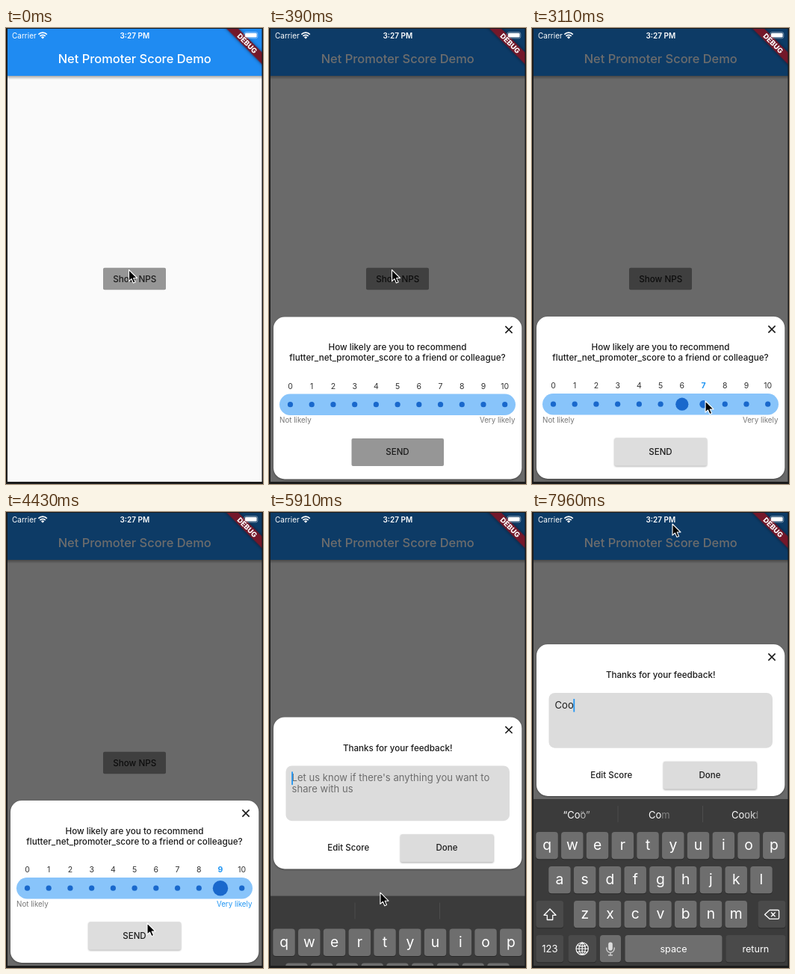
These frames come from a looping animation (344 px wide and 610 px high, 7990 ms). An HTML page:

```html
<!DOCTYPE html>
<html lang="en">
<head>
<meta charset="utf-8">
<title>Score sheet</title>
<style>
  html, body { margin: 0; width: 100%; height: 100%; overflow: hidden; background: #1b1b1b; }
  svg { display: block; width: 344px; height: 610px; }
  text { font-family: Inter, Roboto, sans-serif; white-space: pre; }
  .raised { filter: drop-shadow(0 1px 1px rgba(0, 0, 0, .35)); }
</style>
</head>
<body>
<svg id="stage" viewBox="0 0 344 610">
  <defs>
    <linearGradient id="fade" x2="0" y2="1">
      <stop stop-opacity=".32"/><stop offset="1" stop-opacity="0"/>
    </linearGradient>
  </defs>
</svg>
<script>
const LOOP = 7990;
const BLUE = '#2196f3', INK = '#1c1c1c', KEY = '#6e6e6e', DARK_KEY = '#4a4a4a';
const stage = document.getElementById('stage');

function el(tag, attrs, parent = stage, content) {
  const node = document.createElementNS('http://www.w3.org/2000/svg', tag);
  for (const name in attrs) node.setAttribute(name, attrs[name]);
  if (content !== undefined) node.textContent = content;
  return parent.appendChild(node);
}
const group = (parent = stage) => el('g', {}, parent);
const rect = (parent, x, y, width, height, fill, rx = 0, more = {}) =>
  el('rect', { x, y, width, height, fill, rx, ...more }, parent);
const label = (parent, x, y, size, content, more = {}) =>
  el('text', { x, y, 'font-size': size, 'text-anchor': 'middle', fill: INK, ...more }, parent, content);
const line = (parent, d, stroke, width, more = {}) =>
  el('path', { d, stroke, 'stroke-width': width, fill: 'none', ...more }, parent);
const medium = { 'font-weight': 500 };

// Page
const page = group();
rect(page, 2, 1, 341, 606, '#fafafa');
rect(page, 2, 64, 341, 5, 'url(#fade)');
rect(page, 2, 1, 341, 63, '#1f8bf2');
label(page, 172.2, 47.2, 16.45, 'Net Promoter Score Demo', { fill: '#fff', ...medium });
rect(page, 130, 320.8, 84, 29.4, '#969696', 2);
label(page, 172.2, 339.5, 11.7, 'Show NPS', medium);
const scrim = rect(stage, 2, 1, 341, 606, '#000');

function sheet(height) {
  const g = group();
  rect(g, 6, 0, 332.3, height, '#fff', 15, { class: 'raised' });
  line(g, 'M316.4 12.4l9.2 9.2m0-9.2l-9.2 9.2', INK, 1.6);
  return g;
}

// Score sheet
const scoreSheet = sheet(217);
label(scoreSheet, 172, 45, 11.65, 'How likely are you to recommend', medium);
label(scoreSheet, 172, 58.7, 11.7, 'flutter_net_promoter_score to a friend or colleague?', medium);
rect(scoreSheet, 14, 103, 316, 28.5, '#88c4fa', 14.25);
const marks = Array.from({ length: 11 }, (_, i) => {
  const x = 28.5 + 28.72 * i;
  return {
    number: label(scoreSheet, x, 96.3, 10.5, i),
    dot: el('circle', { cx: x, cy: 117.2, r: 3.6, fill: '#1968cc' }, scoreSheet)
  };
});
const notLikely = label(scoreSheet, 14, 142, 9.8, 'Not likely', { 'text-anchor': 'start' });
const veryLikely = label(scoreSheet, 329.5, 142, 9.8, 'Very likely', { 'text-anchor': 'end' });
const sendShadow = rect(scoreSheet, 110.5, 162.5, 123.5, 37, '#ddd', 2, { class: 'raised' });
const send = rect(scoreSheet, 110.5, 162.5, 123.5, 37, '#ddd', 2);
label(scoreSheet, 172, 185, 11.5, 'SEND', medium);

// Feedback sheet
const feedbackSheet = sheet(203);
label(feedbackSheet, 172.2, 45.2, 11.65, 'Thanks for your feedback!', medium);
rect(feedbackSheet, 22.5, 65, 299.5, 73.7, '#dcdcdc', 8);
const hint = group(feedbackSheet);
const hintStyle = { 'text-anchor': 'start', fill: '#6d6d6d' };
label(hint, 30.6, 85.4, 13.05, "Let us know if there's anything you want to", hintStyle);
label(hint, 30.6, 101, 13.05, 'share with us', hintStyle);
const typed = label(feedbackSheet, 30.6, 85.6, 13.05, '', { 'text-anchor': 'start' });
const caret = rect(feedbackSheet, 0, 73, 1.8, 17.5, BLUE);
label(feedbackSheet, 106.3, 179, 11.5, 'Edit Score', medium);
rect(feedbackSheet, 176, 156.7, 124.5, 37, '#dcdcdc', 2, { class: 'raised' });
label(feedbackSheet, 238, 179, 11.5, 'Done', medium);

// Keyboard
const keyboard = group();
rect(keyboard, 2, 0, 341, 240, '#3b3b3b');
line(keyboard, 'M115 9v22M228.5 9v22', '#4c4c4c', 1);

function key(x, y, width, fill, content, size) {
  rect(keyboard, x, y + 1, width, 36.3, '#292929', 4);
  rect(keyboard, x, y, width, 36.3, fill, 4);
  if (content) label(keyboard, x + width / 2, y + (size > 15 ? 24 : 22.5), size, content, { fill: '#fff' });
}
['qwertyuiop', 'asdfghjkl', 'zxcvbnm'].forEach((row, r) => {
  const left = [5.3, 22.2, 56][r];
  [...row].forEach((c, i) => key(left + 33.75 * i, 44 + 46 * r, 29.5, KEY, c, 19.3));
});
key(5.3, 136, 37, DARK_KEY);
key(302.5, 136, 37, DARK_KEY);
key(5.3, 182, 37, DARK_KEY, '123', 13);
key(48.5, 182, 37.5, DARK_KEY);
key(91, 182, 28, KEY);
key(124.5, 182, 130, KEY, 'space', 12.6);
key(259.3, 182, 80.2, DARK_KEY, 'return', 12.6);
line(keyboard, 'M24 147l8 8.3h-4.3v6.2h-7.4v-6.2H16z', '#fff', 1.3, { 'stroke-linejoin': 'round' });
line(keyboard, 'M318 148.5h11q1.6 0 1.6 1.6v8.6q0 1.6-1.6 1.6h-11l-6.5-5.9zM320 151.5l5.6 5.8m0-5.8l-5.6 5.8',
  '#fff', 1.3, { 'stroke-linejoin': 'round' });
line(keyboard, 'M59 200.2a8.2 8.2 0 1 0 16.4 0a8.2 8.2 0 1 0-16.4 0zh16.4M67.2 192v16.4' +
  'M67.2 192c-5.6 4-5.6 12.4 0 16.4c5.6-4 5.6-12.4 0-16.4M60.7 195.5q6.5 3 13 0M60.7 205q6.5-3 13 0', '#fff', 1.1);
rect(keyboard, 102.2, 191.5, 5.6, 11, '#ddd', 2.8);
line(keyboard, 'M99.8 198.5v1.7a5.2 5.2 0 0 0 10.4 0v-1.7M105 205.4v3.4m-3 0h6', '#ddd', 1.2);

// Suggestions: a first set, then a kept stem whose ending dissolves into the next one
const firstWords = group(keyboard), stems = group(keyboard), oldEnds = group(keyboard), newEnds = group(keyboard);
[
  [41.5, '“C”', '“Co', '”', 'o”'],
  [156, 'Can', 'Co', 'm', ''],
  [267, 'Come', 'Co', 'uld', 'ok']
].forEach(([x, first, stem, before, after]) => {
  const style = { 'text-anchor': 'start', fill: '#fff' };
  label(firstWords, x, 25.6, 13, first, style);
  label(stems, x, 25.6, 13, stem, style);
  [[oldEnds, before], [newEnds, after]].forEach(([parent, end]) => {
    const text = label(parent, x, 25.6, 13, '', style);
    el('tspan', { 'fill-opacity': 0 }, text, stem);
    el('tspan', {}, text, end);
  });
});

// Banner and status bar
const banner = el('g', { transform: 'translate(342.5 1) rotate(45)' });
rect(banner, -40, 22.2, 80, 11.2, '#74182a', 0, { style: 'filter:drop-shadow(0 0 2px rgba(0,0,0,.5))' });
label(banner, 0, 31.2, 9.5, 'DEBUG', { fill: '#fff', 'font-weight': 800 });
label(stage, 8, 13.7, 10, 'Carrier', { fill: '#fff', 'text-anchor': 'start' });
label(stage, 172.3, 13.7, 10, '3:27 PM', { fill: '#fff', 'font-weight': 600 });
line(stage, 'M43.4 8.6a8 8 0 0 1 11.4 0M45.5 10.9a5 5 0 0 1 7.2 0', '#fff', 1.7);
el('path', { d: 'M47 12.4a3 3 0 0 1 4.2 0l-2.1 2.1z', fill: '#fff' });
rect(stage, 318.8, 5.6, 18, 8.2, 'none', 2.4, { stroke: '#fff', 'stroke-opacity': .5, 'stroke-width': .8 });
rect(stage, 320, 6.8, 15.6, 5.8, '#fff', 1.4);
el('path', { d: 'M0 0H344V610H0zM2 1V607H342.5V1z', fill: '#1b1b1b', 'fill-rule': 'evenodd' });

const pointer = el('path', {
  d: 'M0 0V15.2L3.5 12L5.9 17.6L8.6 16.4L6.2 11H11z',
  fill: '#000', stroke: '#fff', 'stroke-width': 1.1, 'stroke-linejoin': 'round'
});

// Timing
const pointerPath = [
  [0, 164.5, 323.5], [820, 164.5, 323.5], [1450, 92, 527], [1860, 84, 501], [1990, 129, 499],
  [2400, 158, 499], [3100, 232, 499], [3700, 286, 499], [4060, 286, 499], [4430, 189, 550],
  [5200, 188, 551], [5700, 150, 510], [5880, 150, 510], [6160, 119, 487], [6400, 150, 240],
  [6850, 188, 16], [LOOP, 188, 16]
];
const scores = [[1930, 2], [2050, 3], [2290, 4], [2540, 5], [2790, 6], [3050, 7], [3350, 8], [3640, 9]];
const keyTimes = [7320, 7580, 7850];

const progress = (t, start, length) => Math.min(1, Math.max(0, (t - start) / length));
const easeOut = (p, power = 3) => 1 - (1 - p) ** power;
const mix = (a, b, p) => a + (b - a) * p;
const moveY = (node, y) => node.setAttribute('transform', `translate(0 ${y})`);
const show = (node, opacity) => node.setAttribute('opacity', +opacity);

function pointerAt(t) {
  const i = pointerPath.findIndex(step => step[0] > t);
  const [t0, x0, y0] = pointerPath[i - 1], [t1, x1, y1] = pointerPath[i];
  const p = progress(t, t0, t1 - t0), s = p * p * (3 - 2 * p);
  return [mix(x0, x1, s), mix(y0, y1, s)];
}

function drawScore(t) {
  const size = Array(11).fill(0);
  let score = -1;
  scores.forEach(([at, value], i) => {
    const next = scores[i + 1];
    size[value] = progress(t, at, 250) * (next ? 1 - progress(t, next[0], 250) : 1);
    if (t >= at) score = value;
  });
  marks.forEach(({ number, dot }, i) => {
    const on = i === score;
    number.setAttribute('fill', on ? BLUE : '#333');
    number.setAttribute('font-weight', on ? 700 : 400);
    dot.setAttribute('r', mix(3.6, 10.2, size[i]));
  });
  notLikely.setAttribute('fill', score >= 0 && score < 7 ? BLUE : '#777');
  veryLikely.setAttribute('fill', score > 8 ? BLUE : '#777');
  send.setAttribute('fill', score < 0 ? '#969696' : '#ddd');
  show(sendShadow, progress(t, 1990, 200));
}

function drawTyping(t) {
  const count = keyTimes.filter(at => t >= at).length;
  typed.textContent = 'Coo'.slice(0, count);
  show(hint, !count);
  caret.setAttribute('x', 30.2 + (count ? typed.getComputedTextLength() : 0));
  show(caret, t >= 5870 && (count > 0 || (t - 5870) % 1000 < 500));
  const second = progress(t, 7620, 120), third = progress(t, 7880, 125);
  show(firstWords, progress(t, 7380, 120) * (1 - second));
  show(stems, second);
  show(oldEnds, second * (1 - third));
  show(newEnds, third);
}

function draw(t) {
  const opened = easeOut(progress(t, 130, 300));
  show(scrim, .575 * opened);
  moveY(scoreSheet, mix(610, 386, opened) + 224 * progress(t, 4820, 200) ** 2);
  const raised = easeOut(progress(t, 5027, 300));
  const lifted = easeOut(progress(t, 5870, 170));
  moveY(feedbackSheet, mix(607, 400, raised) - 223 * lifted);
  moveY(keyboard, mix(610, 384, easeOut(progress(t, 5850, 470), 4)));
  drawScore(t);
  drawTyping(t);
  pointer.setAttribute('transform', `translate(${pointerAt(t)})`);
}

const begin = performance.now();
function tick() {
  draw((performance.now() - begin) % LOOP);
  requestAnimationFrame(tick);
}
tick();
</script>
</body>
</html>
```
